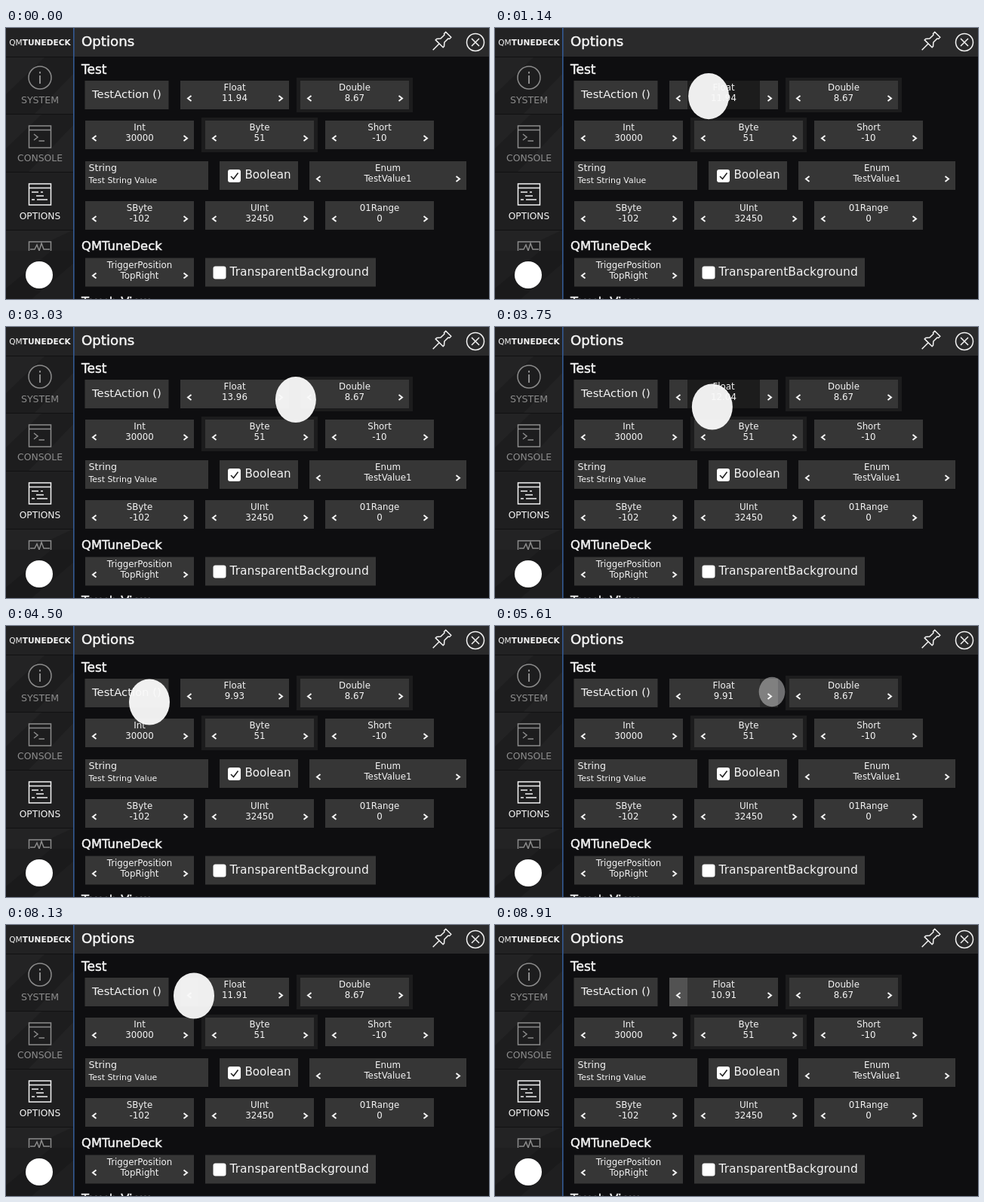
These frames come from a looping animation (640x360 px, 9930 ms). An HTML page:

```html
<!DOCTYPE html>
<html lang="en">
<head>
<meta charset="utf-8">
<title>Options panel</title>
<style>
  html, body { margin: 0; width: 100%; height: 100%; overflow: hidden; background: #0e0e10; }
  svg { display: block; width: 640px; height: 360px; }
  text { font-family: "DejaVu Sans", Verdana, sans-serif; fill: #f4f4f4; }
  .mid { text-anchor: middle; }
  .title { stroke: #f4f4f4; stroke-width: 0.5; }
  .line { fill: none; stroke: #f4f4f4; stroke-width: 1.5; }
  .bold { stroke-width: 2; }
  .dim .line { stroke: #8c8c8c; }
  .dim text { fill: #8c8c8c; }
</style>
</head>
<body>
<svg id="stage" viewBox="0 0 640 360"></svg>
<script>
const LOOP = 9930;
const FILL = '#363636', HOVER = '#525252', PRESSED = '#1c1c1c';

const rect = (x, y, w, h, fill, extra = '') =>
  `<rect x="${x}" y="${y}" width="${w}" height="${h}" fill="${fill}" ${extra}/>`;
const text = (x, y, size, str, extra = '') =>
  `<text x="${x}" y="${y}" font-size="${size}" ${extra}>${str}</text>`;
const centred = (x, y, size, str) => text(x, y, size, str, 'class="mid"');
const title = (x, y, size, str) => text(x, y, size, str, 'class="title"');
const line = (d, cls = '') => `<path class="line ${cls}" d="${d}"/>`;
const box = (x, y, w) => rect(x, y, w, 38, FILL);
const frame = (x, y) => rect(x - 5, y - 4, 154, 46, '#1c1c1d');
const checkbox = (x, y) => rect(x, y, 17, 17, '#fff', 'rx="3"');

// A field with a name, a value and an arrow at each end.
function spinner(x, y, name, value, w = 144, parts = '') {
  const c = x + w / 2, m = y + 23.5, r = x + w;
  return box(x, y, w) + parts +
    centred(c, y + 13.3, 11.8, name) +
    centred(c, y + 27.3, 11.8, value) +
    line(`M${x + 14.5} ${m - 3.5}l-4.5 3.5 4.5 3.5M${r - 13.5} ${m - 3.5}l4.5 3.5-4.5 3.5`, 'bold');
}

const buttons = [['left', 231, 24], ['middle', 255, 96], ['right', 351, 24]]
  .map(([id, x, w]) => rect(x, 70, w, 38, HOVER, `id="${id}" opacity="0"`)).join('');

const sidebar = `
  ${rect(0, 0, 90, 360, '#1d1d1e')}
  <path d="M0 38L52 38 0 88zM90 60L90 114 38 114zM0 114H48L0 160zM90 128V191H30z" fill="#232324"/>
  <path d="M0 268H90L30 296H0z" fill="#232324"/>
  ${rect(0, 0, 90, 38, '#222223')}
  ${rect(0, 191, 90, 77, '#1f1f20')}
  ${[38, 114, 191, 268].map(y => rect(0, y, 90, 1, '#111112')).join('')}
  ${centred(45, 23, 10.6, 'QM<tspan font-weight="bold">TUNEDECK</tspan>')}
  <g class="dim">
    <circle class="line" cx="45" cy="66" r="15"/>
    ${line('M45 63V74M45 58V60.5', 'bold')}
    ${centred(45, 100, 12.6, 'SYSTEM')}
    ${line('M30.5 130H59.5V159H30.5zM30.5 135.5H59.5M37 141l5 4-5 4M43.5 150H51')}
    ${centred(45, 177, 12.4, 'CONSOLE')}
    ${line('M30.5 296V284H59.5V296M32 294H38L41 288 44 296 47 286 50 294H58')}
  </g>
  ${line('M30.5 207H59.5V235H30.5zM30.5 212.5H59.5M34 218H43M46 218H49M40 223H50M34 228H38M41 228H55')}
  ${centred(45, 254, 12.2, 'OPTIONS')}
  ${rect(0, 296, 90, 64, '#1a1a1b')}
  <path d="M0 296H60L0 346zM90 312V360H34z" fill="#1f1f20"/>
  <circle cx="44" cy="328" r="18" fill="#fff"/>
  ${rect(89, 0, 1.6, 360, '#345a92')}`;

const header = `
  ${rect(90, 0, 550, 38, '#2a2a2b')}
  ${title(100, 24, 18.2, 'Options')}
  <g transform="translate(577 18) rotate(45)">
    ${line('M-5-13H5V-10L3.5-9V-2L7 2V4H-7V2L-3.5-2V-9L-5-10zM0 4V16')}
  </g>
  <circle class="line" cx="622" cy="19" r="11.5"/>
  ${line('M617 14l10 10M627 14l-10 10')}`;

const fields = `
  ${title(100, 60.5, 17, 'Test')}
  ${box(104.5, 70, 111)}${text(114, 93, 14.8, 'TestAction ()')}
  ${spinner(231, 70, 'Float', '<tspan id="value">11.94</tspan>', 144, buttons)}
  ${frame(390, 70)}${spinner(390, 70, 'Double', '8.67')}
  ${spinner(105, 123, 'Int', '30000')}
  ${frame(264, 123)}${spinner(264, 123, 'Byte', '51')}
  ${spinner(423, 123, 'Short', '-10')}
  ${box(105, 177, 163)}${text(109.5, 190, 12.6, 'String')}${text(109.5, 205.5, 10.9, 'Test String Value')}
  ${box(283, 177, 104)}${checkbox(294, 188)}
  <path d="M298 197l3.5 3.5 6-8" fill="none" stroke="#222" stroke-width="1.6"/>
  ${text(316.5, 200, 15.1, 'Boolean')}
  ${spinner(402, 177, 'Enum', 'TestValue1', 208)}
  ${spinner(105, 230, 'SByte', '-102')}
  ${spinner(264, 230, 'UInt', '32450')}
  ${spinner(423, 230, '01Range', '0')}
  ${title(100, 295, 16.4, 'QMTuneDeck')}
  ${spinner(105, 305.5, 'TriggerPosition', 'TopRight')}
  ${box(264, 305.5, 226)}${checkbox(274.5, 316.5)}
  ${text(296.5, 328.5, 15.5, 'TransparentBackground')}
  ${title(100, 369, 16.4, 'Touch View')}`;

const $ = id => document.getElementById(id);
$('stage').innerHTML = rect(0, 0, 640, 360, '#0e0e10') + header + fields + sidebar +
  '<ellipse id="finger" rx="27" ry="30.6" fill="#fafafa"/>';

// Drag path: time, x, y.
const drag = [
  [690, 283, 90.5], [1140, 283, 90.5], [1500, 322, 101], [1770, 363, 98.5],
  [2130, 402, 98], [2400, 414, 97.5], [2670, 414, 97.5], [3030, 384, 96.5],
  [3660, 305, 106], [4100, 222, 106], [4500, 190, 101], [4620, 189, 100], [4740, 189, 98.5]
];
// Touches: press time, release time, path.
const touches = [
  [690, 4740, drag],
  [5550, 5970, [[0, 367, 87.5]]],
  [6360, 6780, [[0, 362.5, 98]]],
  [7770, 8130, [[0, 249, 94]]],
  [8400, 8730, [[0, 250, 92.5]]]
];
// Value steps: time, change.
const steps = [[5640, 1], [6000, 1], [6390, 1], [7830, -1], [8460, -1]];
// When the pointer rests on each button: dark while held, light after release.
const hovers = {
  left: [[7770, LOOP + 200]],
  middle: [[690, 1691], [3293, 3925]],
  right: [[5550, 7770]]
};

const clamp = v => Math.min(1, Math.max(0, v));
const ramp = (t, start, length) => clamp((t - start) / length);

function along(path, t) {
  const i = path.findIndex(p => p[0] > t);
  if (i < 0) return path[path.length - 1].slice(1);
  if (i === 0) return path[0].slice(1);
  const [a, b] = [path[i - 1], path[i]];
  const k = ramp(t, a[0], b[0] - a[0]);
  return [1, 2].map(n => a[n] + (b[n] - a[n]) * k);
}

function draw(t) {
  const finger = $('finger');
  const touch = touches.find(([down, up]) => t >= down && t < up + 180);
  finger.setAttribute('opacity', 0);
  if (touch) {
    const [down, up, path] = touch;
    const press = 1 - (1 - ramp(t, down, 210)) ** 1.25;
    const lift = ramp(t, up, 170);
    const [x, y] = along(path, t);
    const scale = 0.45 + 0.55 * press + 0.12 * lift;
    finger.setAttribute('transform', `translate(${x} ${y}) scale(${scale})`);
    finger.setAttribute('opacity', 0.95 * press ** 0.8 * (1 - lift));
  }

  const shift = along(drag, t)[0] - 283;
  let value = 11.94 + shift * (shift > 0 ? 0.02 : 0.0216);
  for (const [at, change] of steps) if (t >= at) value += change;
  $('value').textContent = value.toFixed(2);

  const held = touch && t < touch[1];
  for (const part in hovers) {
    const shown = hovers[part].reduce(
      (sum, [from, to]) => sum + ramp(t, from, 150) - ramp(t, to, 150), 0);
    $(part).setAttribute('opacity', shown);
    $(part).setAttribute('fill', held ? PRESSED : HOVER);
  }
}

const start = performance.now();
function tick() {
  draw((performance.now() - start) % LOOP);
  requestAnimationFrame(tick);
}
tick();
</script>
</body>
</html>
```
